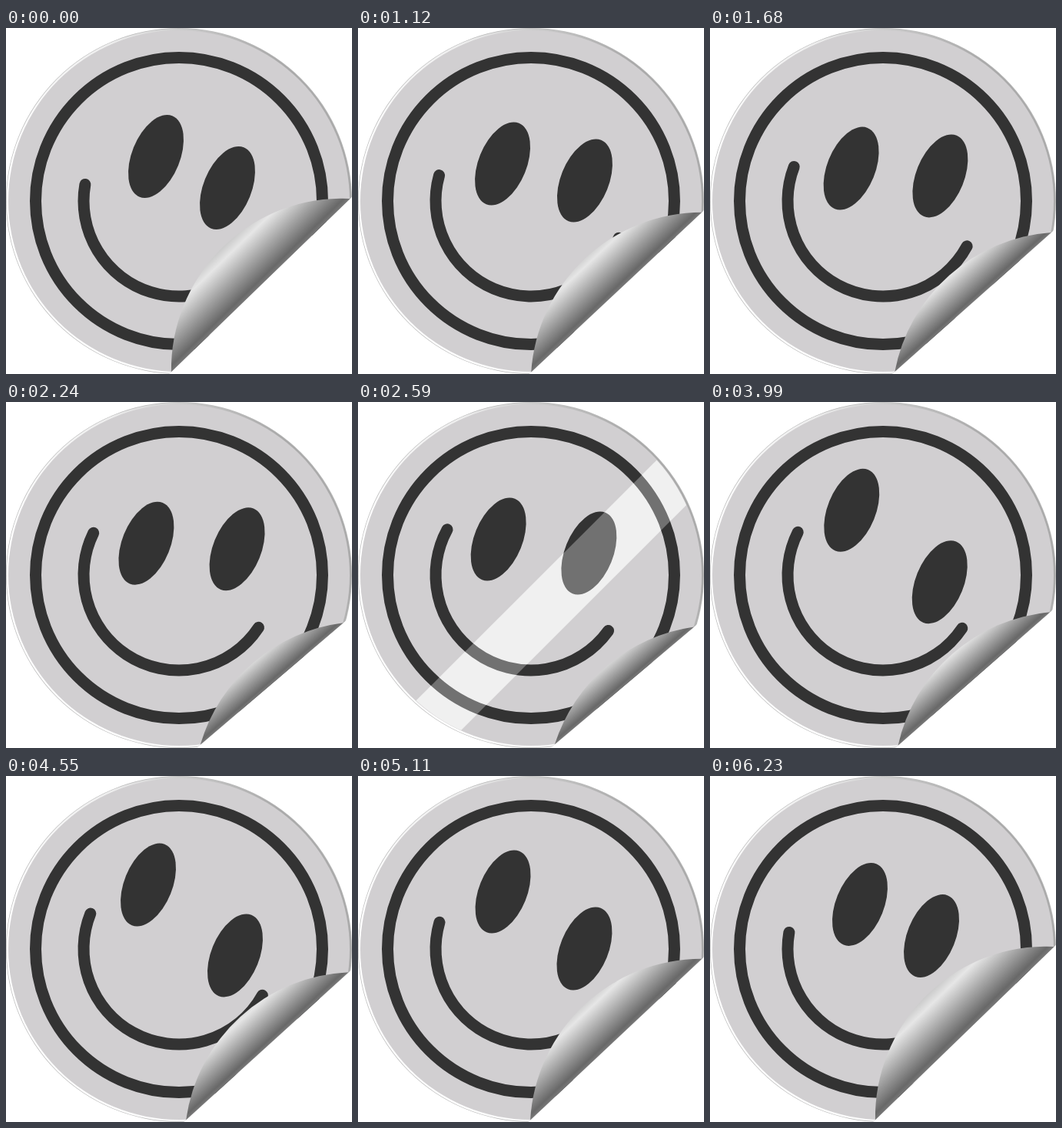
Animation of 450x450 px, one loop 6.3 s. Source, as an HTML page with a canvas:

```html
<!DOCTYPE html>
<html lang="en">
<head>
<meta charset="utf-8">
<title>Peeling smiley sticker</title>
<style>
html, body { margin: 0; width: 100%; height: 100%; overflow: hidden; background: #fff; }
canvas { display: block; }
</style>
</head>
<body>
<canvas id="stage" width="450" height="450"></canvas>
<script>
const ctx = document.getElementById('stage').getContext('2d');
const STEP = 70, STEPS = 90, C = 225, R = 222.5;
const INK = '#333', PAPER = '#d1cfd1';
const rad = deg => deg * Math.PI / 180;
const mix = (a, b, p) => a + (b - a) * p;
const ease = p => (1 - Math.cos(Math.PI * Math.min(1, Math.max(0, p)))) / 2;

// Eye offsets from their shared midpoint, one per third of the loop
const eyeKeys = [[46.5, 20.5], [59.1, 3.3], [57.2, 47.8]];

function disc(x, y, r, fill) {
  ctx.beginPath();
  ctx.arc(x, y, r, 0, 2 * Math.PI);
  ctx.fillStyle = fill;
  ctx.fill();
}

function arc(r, from, to) {
  ctx.beginPath();
  ctx.arc(C, C, r, rad(from), rad(to));
  ctx.strokeStyle = INK;
  ctx.lineWidth = 15;
  ctx.lineCap = 'round';
  ctx.stroke();
}

function eye(x, y) {
  ctx.beginPath();
  ctx.ellipse(x, y, 31.3, 56.8, rad(22), 0, 2 * Math.PI);
  ctx.fillStyle = INK;
  ctx.fill();
}

function gradient(x0, y0, x1, y1, stops) {
  const g = ctx.createLinearGradient(x0, y0, x1, y1);
  stops.forEach(([at, color]) => g.addColorStop(at, color));
  return g;
}

// Diagonal glint, kept inside the rim
function shine(step, fill) {
  const edge = 464 + 86 * (step - 37);
  ctx.save();
  ctx.beginPath();
  ctx.arc(C, C, 221.5, 0, 2 * Math.PI);
  ctx.clip();
  ctx.translate(C, C);
  ctx.rotate(Math.PI / 4);
  ctx.fillStyle = fill;
  ctx.fillRect((edge - 2 * C) / Math.SQRT2, -C, 97 / Math.SQRT2, 2 * C);
  ctx.restore();
}

function sticker(step) {
  disc(C, C, 225, '#bbb');
  disc(C, C, 224.3, gradient(60, 300, 400, 140, [[0, '#fff'], [.5, '#eee'], [1, '#aaa']]));
  disc(C, C, 222, PAPER);
  shine(step, '#e9e9e9');

  arc(186.5, 0, 360);
  const tilt = mix(10, 30, ease(step < 45 ? step / 45 : 2 - step / 45));
  arc(124, tilt + 7.3, tilt + 180);

  const third = Math.floor(step / 30), p = ease(step % 30 / 30);
  const [dx, dy] = eyeKeys[third].map((v, i) => mix(v, eyeKeys[(third + 1) % 3][i], p));
  eye(241.5 - dx, 187.5 - dy);
  eye(241.5 + dx, 187.5 + dy);
  shine(step, 'rgba(255,255,255,.3)');
}

function draw(step) {
  const flat = step < 39 ? ease((step - 5) / 33) : 1 - ease((step - 40) / 48);
  const a = rad(mix(-.8, 17.7, flat)), b = rad(mix(92.6, 82, flat));
  const axis = (a + b) / 2, half = (b - a) / 2;
  const fold = R * Math.cos(half);

  ctx.clearRect(0, 0, 450, 450);
  ctx.save();
  ctx.translate(C, C);
  ctx.rotate(axis);
  ctx.beginPath();
  ctx.rect(-300, -300, 300 + fold, 600);
  ctx.clip();
  ctx.rotate(-axis);
  ctx.translate(-C, -C);
  sticker(step);
  ctx.restore();

  // The curl mirrors the missing segment across the fold
  const reach = 28 + .62 * (R - fold);
  ctx.save();
  ctx.translate(C, C);
  ctx.rotate(axis);
  ctx.beginPath();
  ctx.arc(2 * fold, 0, R, Math.PI - half, Math.PI + half);
  ctx.closePath();
  ctx.fillStyle = gradient(fold, 0, fold - reach, 0, [
    [0, '#777'], [.08, '#686868'], [.4, '#a0a0a0'], [.8, '#e6e6e6'], [1, '#c8c8c8']
  ]);
  ctx.fill();
  ctx.restore();
}

function tick() {
  draw(Math.floor(performance.now() / STEP) % STEPS);
  requestAnimationFrame(tick);
}
tick();
</script>
</body>
</html>
```
